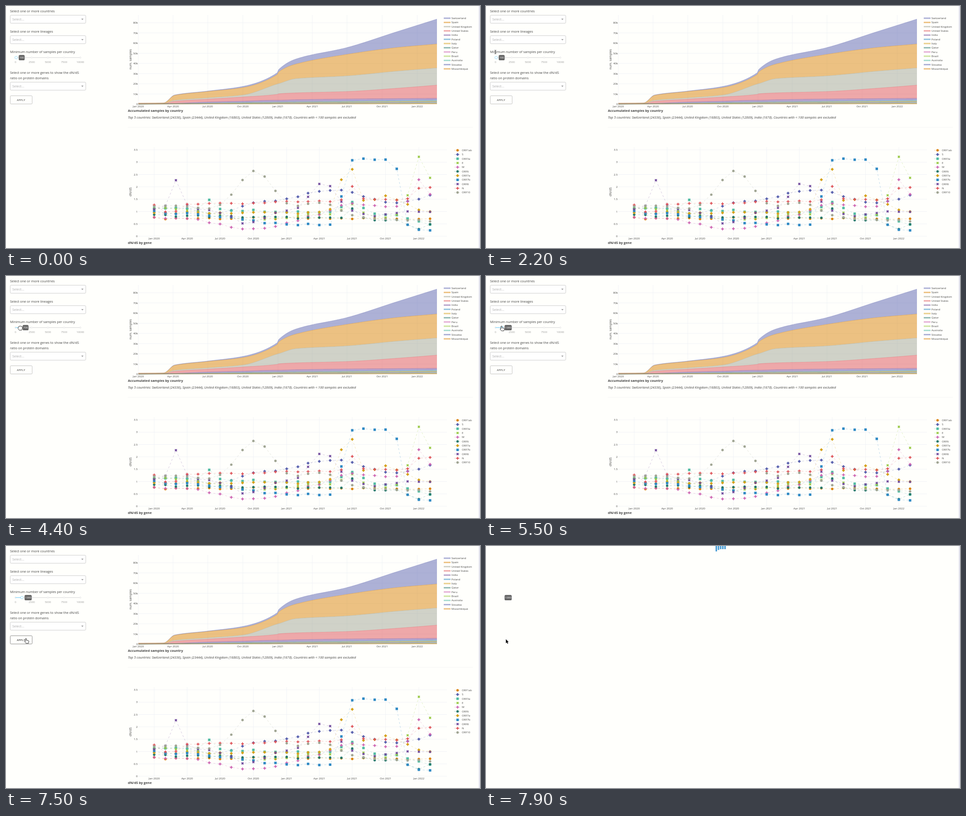
Animation of 1046 by 535 pixels, one loop 8 s. Source, as an HTML page with a canvas:

```html
<!DOCTYPE html>
<html lang="en">
<head>
<meta charset="utf-8">
<title>Samples dashboard</title>
<style>
html, body { margin: 0; width: 100%; height: 100%; overflow: hidden; background: #fffffc; }
canvas { display: block; width: 1046px; height: 535px; }
</style>
</head>
<body>
<canvas id="stage"></canvas>
<script>
const W = 1046, H = 535, LOOP = 8000, STEP = 100, PAPER = '#fffffc';
const INK = '#444', GRID = '#eef0f5', FONT = '"Open Sans", "Noto Sans", sans-serif';
const ORANGE = '#DA8309', INDIGO = '#5D65B0', MINT = '#52BCA3', LIME = '#99C945', PINK = '#CC61B0',
  GREEN = '#24796C', GOLD = '#D5A21C', BLUE = '#2F8AC4', PURPLE = '#704A9C', RED = '#DE5257', GREY = '#A1A694';

const dpr = window.devicePixelRatio || 1;

function surface(canvas) {
  canvas.width = W * dpr;
  canvas.height = H * dpr;
  const context = canvas.getContext('2d');
  context.scale(dpr, dpr);
  return context;
}

const screen = surface(document.getElementById('stage'));
const still = document.createElement('canvas');
let ctx = surface(still);

// y is the middle of the capital letters
function text(str, x, y, size, { color = INK, align = 'left', style = '', spacing = 0 } = {}) {
  ctx.font = `${style} ${size}px ${FONT}`;
  ctx.letterSpacing = spacing + 'px';
  ctx.textAlign = align;
  ctx.fillStyle = color;
  ctx.fillText(str, x, y + size * 0.355);
}

function verticalText(str, x, y) {
  ctx.save();
  ctx.translate(x, y);
  ctx.rotate(-Math.PI / 2);
  text(str, 0, 0, 6.9, { align: 'center' });
  ctx.restore();
}

function trace(points) {
  ctx.beginPath();
  points.forEach(([x, y]) => ctx.lineTo(x, y));
}

function line(x1, y1, x2, y2, color, width = 1) {
  trace([[x1, y1], [x2, y2]]);
  ctx.strokeStyle = color;
  ctx.lineWidth = width;
  ctx.stroke();
}

function box(x, y, w, h, r, fill, stroke) {
  ctx.beginPath();
  ctx.roundRect(x, y, w, h, r);
  if (fill) { ctx.fillStyle = fill; ctx.fill(); }
  if (stroke) { ctx.strokeStyle = stroke; ctx.lineWidth = 0.9; ctx.stroke(); }
}

function disc(x, y, r, fill, stroke) {
  ctx.beginPath();
  ctx.arc(x, y, r, 0, 7);
  ctx.fillStyle = fill;
  ctx.fill();
  if (stroke) { ctx.strokeStyle = stroke; ctx.lineWidth = 1; ctx.stroke(); }
}

const daysTo = month => (Date.UTC(2020, month, 1) - Date.UTC(2020, 0, 1)) / 864e5;

function axes({ left, right, top, bottom, monthX, labelY, rows, rowHeight, rowLabel }) {
  for (let m = 0; m < 27; m += 3) {
    const x = monthX(m);
    line(x, top, x, bottom, GRID, 0.8);
    const name = ['Jan', 'Apr', 'Jul', 'Oct'][m / 3 % 4];
    text(`${name} ${2020 + Math.floor(m / 12)}`, x, labelY, 6.1, { align: 'center' });
  }
  for (let i = 0; i < rows; i++) {
    const y = bottom - i * rowHeight;
    line(left, y, right, y, GRID, 0.8);
    text(rowLabel(i), left - 1, y, 6.1, { align: 'right' });
  }
}

// ---- stacked areas -------------------------------------------------

const LEFT = 292, RIGHT = 951, BASE = 217;

// Monotone cubic through the key points, so that totals never overshoot
function smooth(xs, ys) {
  const slopes = xs.slice(1).map((x, i) => (ys[i + 1] - ys[i]) / (x - xs[i]));
  const tangents = xs.map((_, i) => {
    const a = slopes[i - 1] ?? slopes[i], b = slopes[i] ?? a;
    return a * b > 0 ? 2 * a * b / (a + b) : 0;
  });
  return x => {
    const i = Math.max(0, xs.findLastIndex((key, k) => key <= x && k < xs.length - 1));
    const w = xs[i + 1] - xs[i], p = (x - xs[i]) / w, q = 1 - p;
    return q * q * (1 + 2 * p) * ys[i] + p * p * (3 - 2 * p) * ys[i + 1] +
      w * p * q * (q * tangents[i] - p * tangents[i + 1]);
  };
}

// Running totals in thousands, stacked, at a few turning points
const turningX = [LEFT, 348, 372, 445, 524, 598, 602, 640, 752, 862, RIGHT];
const total = (...thousands) => smooth(turningX, thousands);
const smallTotal = rank => x => 4.1 * 0.77 ** rank * ((x - LEFT) / (RIGHT - LEFT)) ** 0.85;

const countries = [
  ['Switzerland', INDIGO, total(1, 1.3, 9, 12.9, 17.6, 30.7, 34.2, 44.4, 55.6, 71.1, 83.6)],
  ['Spain', ORANGE, total(1, 1.2, 8.6, 12.4, 16.4, 28.9, 31.8, 39.4, 48.9, 55.6, 59.1)],
  ['United Kingdom', GREY, total(0.5, 0.6, 3.8, 6.2, 9.1, 19.7, 20.2, 25.1, 27.8, 32.4, 35.6)],
  ['United States', RED, total(0.4, 0.5, 2.8, 4.9, 7.1, 9.6, 10.2, 11.1, 12.4, 15.6, 18.7)],
  ['India', PURPLE, total(0.3, 0.4, 0.7, 2.1, 3, 3.9, 3.9, 4.4, 5.1, 5.5, 5.8)],
  ...[['Poland', BLUE], ['Italy', GOLD], ['Qatar', GREEN], ['Peru', PINK], ['Brazil', LIME], ['Australia', MINT],
    ['Slovakia', INDIGO], ['Mozambique', ORANGE]].map(([name, color], rank) => [name, color, smallTotal(rank)])
];

function edge(totalAt) {
  const points = [];
  for (let x = LEFT; x <= RIGHT; x++) points.push([x, BASE - totalAt(x) * 2.25]);
  return points;
}

function areaChart() {
  axes({ left: LEFT, right: RIGHT, top: 20, bottom: BASE, labelY: 222, monthX: m => LEFT + daysTo(m) * 0.842,
    rows: 9, rowHeight: 22.5, rowLabel: i => i ? i * 10 + 'k' : '0' });
  verticalText('num. samples', 275, 118);
  countries.forEach(([name, color, totalAt], i) => {
    const upper = edge(totalAt), lower = edge(countries[i + 1]?.[2] ?? (() => 0));
    ctx.fillStyle = ctx.strokeStyle = color;
    ctx.globalAlpha = 0.5;
    trace([...upper, ...lower.reverse()]);
    ctx.fill();
    ctx.lineWidth = 0.7;
    trace(upper);
    ctx.stroke();
    const y = 27 + i * 9.33;
    ctx.fillRect(966, y - 1.5, 15, 3);
    ctx.globalAlpha = 1;
    text(name, 983, y, 6);
  });
  text('Accumulated samples by country', 269, 231, 7.35, { style: 'bold' });
  text('Top 5 countries: Switzerland (24336), Spain (23444), United Kingdom (16863), United States (12869), ' +
    'India (1678). Countries with < 100 samples are excluded', 269, 246.5, 7.35, { style: 'italic' });
}

// ---- monthly ratios ------------------------------------------------

const markers = {
  circle: (x, y) => disc(x, y, 2.7, ctx.fillStyle),
  square: (x, y) => ctx.fillRect(x - 2.7, y - 2.7, 5.4, 5.4),
  diamond(x, y) {
    trace([[x, y - 3.5], [x + 3.5, y], [x, y + 3.5], [x - 3.5, y]]);
    ctx.fill();
  },
  plus(x, y) {
    ctx.fillRect(x - 3.1, y - 1, 6.2, 2);
    ctx.fillRect(x - 1, y - 3.1, 2, 6.2);
  },
  cross(x, y) {
    line(x - 2.1, y - 2.1, x + 2.1, y + 2.1, ctx.fillStyle, 2.1);
    line(x - 2.1, y + 2.1, x + 2.1, y - 2.1, ctx.fillStyle, 2.1);
  }
};

const MONTHS = 26;
const bump = (center, height, width, power = 2) =>
  m => height * Math.exp(-(Math.abs((m - center) / width) ** power));
const noise = seed => { const v = Math.sin(seed * 12.9898) * 43758.5453; return v - Math.floor(v) - 0.5; };

// Each ratio drifts from its first to its last level, with a few bumps on the way
const genes = [
  ['ORF1ab', ORANGE, 'circle', 0.73, 0.71],
  ['S', INDIGO, 'diamond', 1.15, 1.75, bump(5.5, -0.35, 2.5), bump(16, 0.35, 3), bump(22, -0.3, 3)],
  ['ORF3a', MINT, 'square', 1.15, 0.85, bump(5, 0.4, 0.7), bump(18, 0.45, 1.3), bump(25, -0.35, 2)],
  ['E', LIME, 'cross', 1.15, 0.7, bump(9, -0.35, 3.5), bump(18, 0.5, 1), bump(24.2, 2.6, 1.2)],
  ['M', PINK, 'plus', 0.75, 1.3, bump(9.5, -0.65, 5), bump(18, 0.25, 1.5), bump(24.2, 1.1, 0.8)],
  ['ORF6', GREEN, 'circle', 0.85, 0.65, bump(18, 0.42, 0.6), bump(24, -0.4, 1.2)],
  ['ORF7a', GOLD, 'diamond', 0.95, 0.95, bump(17.6, 1.95, 0.95), bump(21, 0.65, 2.3)],
  ['ORF7b', BLUE, 'square', 1, 0.2, bump(11.5, -0.15, 3), bump(19.8, 2.75, 2.85, 8)],
  ['ORF8', PURPLE, 'cross', 1.1, 1, bump(2, 1.2, 0.7), bump(8.5, -0.55, 2), bump(15.4, 1.15, 1.6), bump(20, -0.2, 2)],
  ['N', RED, 'plus', 1.27, 1.5, bump(1.5, -0.4, 0.8), bump(18, 0.62, 0.6), bump(24.5, 0.6, 1)],
  ['ORF10', GREY, 'circle', 1.25, 0.6, bump(9.2, 1.65, 2.2), bump(15, 0.5, 2.3)]
];

function geneChart() {
  const monthX = m => 327 + daysTo(m) * 0.799;
  axes({ left: 291.5, right: 973, top: 312, bottom: 509, labelY: 514, monthX,
    rows: 8, rowHeight: 27.29, rowLabel: i => i / 2 });
  verticalText('dN/dS', 275, 411);
  genes.forEach(([name, color, marker, first, last, ...bumps], i) => {
    const points = Array.from({ length: MONTHS }, (_, m) => {
      const drift = first + (last - first) * m / (MONTHS - 1) + 0.08 * noise(i * MONTHS + m + 1);
      return [monthX(m), 509 - 54.57 * bumps.reduce((sum, at) => sum + at(m), drift)];
    });
    const y = 319 + i * 9.33;
    ctx.strokeStyle = ctx.fillStyle = color;
    ctx.lineWidth = 0.9;
    ctx.globalAlpha = 0.33;
    ctx.setLineDash([4.4, 4.4]);
    trace(points);
    ctx.stroke();
    line(989, y, 1004, y, color, 0.9);
    ctx.setLineDash([]);
    ctx.globalAlpha = 1;
    [...points, [996.5, y]].forEach(([px, py]) => markers[marker](px, py));
    text(name, 1006, y, 6);
  });
  text('dN/dS by gene', 269, 523, 7.35, { style: 'bold' });
}

// ---- side panel ----------------------------------------------------

function dropdown(y) {
  box(9.3, y, 166.7, 17.7, 2, '#fff', '#c8c8c8');
  text('Select...', 14, y + 9, 7.35, { color: '#aaa' });
  ctx.fillStyle = '#999';
  trace([[166, y + 7.6], [171.2, y + 7.6], [168.6, y + 10.4]]);
  ctx.fill();
}

const sliderX = value => 21 + value * 0.0143;

function panel() {
  text('Select one or more countries', 9, 11, 7.35);
  dropdown(20.4);
  text('Select one or more lineages', 9, 56, 7.35);
  dropdown(65.6);
  text('Minimum number of samples per country', 9, 101, 7.35);
  box(20, 113, 146, 2, 1, '#e9e9e9');
  for (let v = 0; v <= 10000; v += 2500) {
    disc(sliderX(v), 114, 1.6, '#fff', '#e6e6e6');
    text(v, sliderX(v), 124.3, 5.95, { color: '#999', align: 'center' });
  }
  text('Select one or more genes to show the dN/dS', 9, 147, 7.35);
  text('ratio on protein domains', 9, 159, 7.35);
  dropdown(168.4);
}

function slider(value, held) {
  const x = sliderX(value);
  box(20.5, 113, x - 20.5, 2, 1, '#abe2fb');
  disc(x, 114, 2.9, '#fff', held ? '#57c5f7' : '#96dbfa');
}

function tooltip(value) {
  const width = value < 1000 ? 13 : 15.7, x = sliderX(value) + 5.7;
  box(x, 108.2, width, 11.8, 2.6, '#646464');
  text(value, x + width / 2, 114.1, 5.9, { color: '#fff', align: 'center' });
}

function button(hover) {
  box(9.4, 198.4, 48.4, 18.2, 2, null, hover ? '#808080' : '#bbb');
  text('APPLY', 24, 207.7, 5.4, { style: '600', color: hover ? '#333' : '#555', spacing: 0.49 });
}

// ---- pointer -------------------------------------------------------

const cursorShapes = {
  arrow: new Path2D('M0 0V9L2.1 7.2L3.6 10.3L5.1 9.6L3.7 6.6L6.3 6.3Z'),
  hand: new Path2D('M-1 6V.9A1.1 1.1 0 0 1 1.2 .9V3.8L5 4.5Q6.7 5 6.4 7L5.5 10.5H.2L-2.7 7Q-3.3 5.2 -1 6Z'),
  fist: new Path2D('M-4.2 -.5Q-4.4 -2.6 -2.8 -2.6Q-2.6 -4.6 -.8 -4Q1 -4.9 2 -3.8Q5 -4.3 5 -1.6V1.2L3.6 4.8H-1.8L-4.4 1.6Z'),
  beam: new Path2D('M-1.8 -4Q0 -4 0 -3V3Q0 4 -1.8 4M1.8 -4Q0 -4 0 -3M0 3Q0 4 1.8 4')
};

function cursor(kind, x, y) {
  const shape = cursorShapes[kind];
  ctx.save();
  ctx.translate(x, y);
  ctx.lineJoin = 'round';
  ctx.strokeStyle = kind === 'arrow' ? '#fff' : '#1a1a1a';
  ctx.fillStyle = kind === 'arrow' ? '#111' : '#fff';
  if (kind === 'arrow') ctx.stroke(shape);
  if (kind !== 'beam') ctx.fill(shape);
  if (kind !== 'arrow') ctx.stroke(shape);
  ctx.restore();
}

// Moves are [start, end, ...destination]; each one slows down towards its end
function glide(moves, t) {
  let place = moves[0].slice(2);
  for (const [start, end, ...goal] of moves) {
    if (t < start) break;
    const p = end > start ? Math.min(1, (t - start) / (end - start)) : 1;
    const eased = 1 - (1 - p) ** 1.5;
    place = place.map((v, i) => v + (goal[i] - v) * eased);
  }
  return place;
}

const valueMoves = [[0, 0, 100], [3700, 4100, 600], [4300, 4400, 700], [4600, 4700, 800], [4800, 4900, 1000]];
const pointerMoves = [
  [1300, 1300, 34, 13], [1300, 1400, 26, 42], [1500, 2400, 20, 108.7], [2500, 3000, 22, 115], [3200, 3400, 22, 110],
  [5400, 5500, 34, 110.8], [5500, 5600, 35, 117], [5700, 6200, 45, 185], [6300, 6500, 45, 197],
  [6600, 6800, 44, 200.5], [7300, 7500, 44, 204.6], [7600, 7700, 43.8, 206]
];

function cursorOver(y) {
  if (y > 104 && y < 120 || y > 196) return 'hand';
  return y > 52 && y <= 104 || y > 140 && y < 180 ? 'beam' : 'arrow';
}

function loader(t) {
  ctx.fillStyle = '#4a9dd6';
  for (let i = 0; i < 5; i++) {
    const grown = Math.max(0, (t - 7700 - i * 130) * 0.025);
    ctx.fillRect(506.6 + i * 4.8, 0, 3.3, 7 + grown);
  }
}

function draw(t) {
  const value = Math.round(glide(valueMoves, t)[0] / 100) * 100;
  const dragging = t >= 3700 && t < 5500, loading = t >= 7700;
  ctx.fillStyle = PAPER;
  ctx.fillRect(0, 0, W, H);
  ctx.fillStyle = '#e2e2ec';
  ctx.fillRect(1043.3, 0, 2.7, H);
  if (loading) {
    loader(t);
  } else {
    ctx.drawImage(still, 0, 0, W, H);
    slider(value, t >= 3400 && t < 5600);
    button(t >= 6500);
  }
  tooltip(value);
  if (t < 1300) return;
  const [x, y] = glide(pointerMoves, t);
  if (dragging) cursor('fist', sliderX(value), 115);
  else cursor(loading ? 'arrow' : cursorOver(y), x, y);
}

// The charts and labels never change, so they are painted once
panel();
line(269, 268, 1030, 268, '#f2f2f2', 0.8);
areaChart();
geneChart();
ctx = screen;

const start = performance.now();
let shown = -1;
function tick() {
  const t = Math.floor((performance.now() - start) % LOOP / STEP) * STEP;
  if (t !== shown) draw(shown = t);
  requestAnimationFrame(tick);
}
tick();
</script>
</body>
</html>
```
